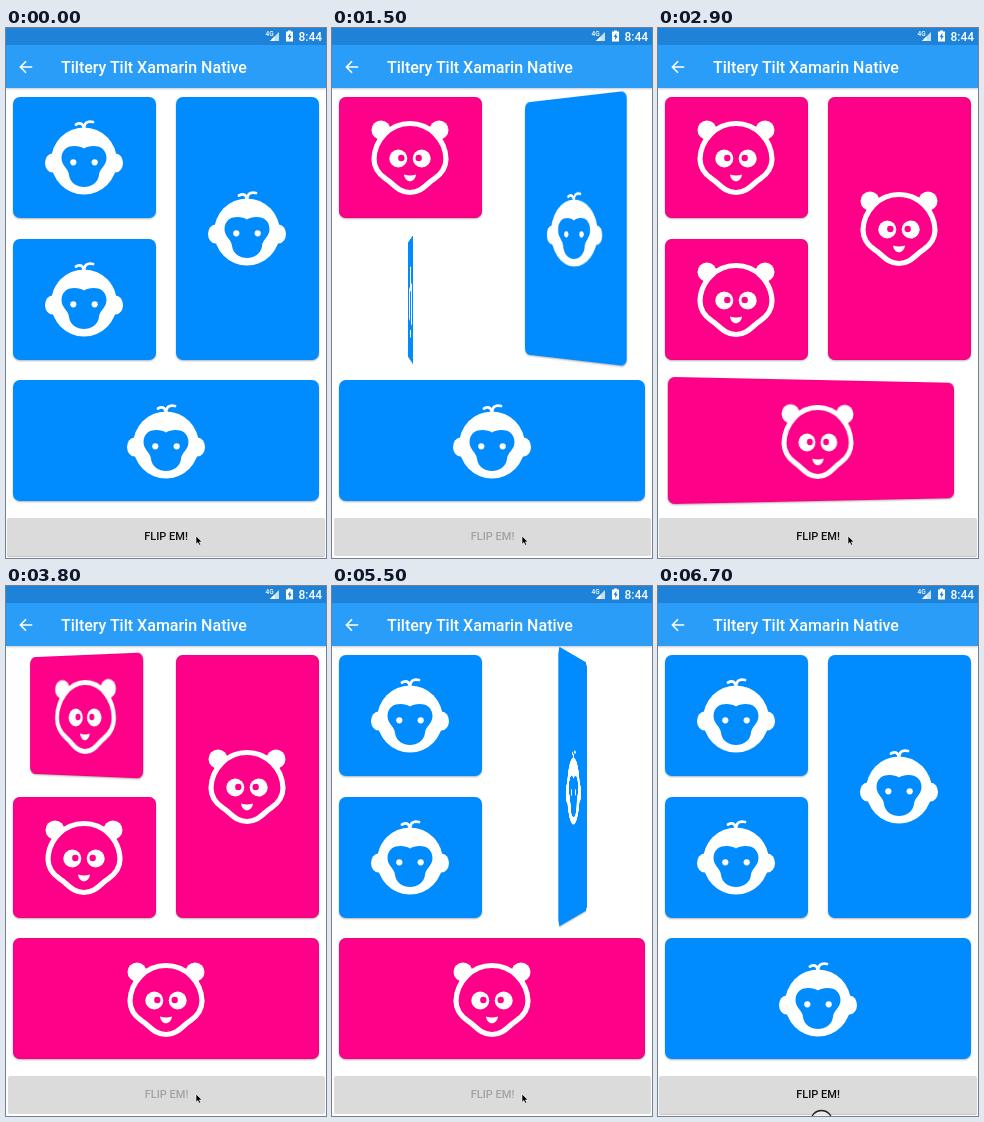
An HTML page for the animation above (6800 ms loop, 320x530 px).

```html
<!DOCTYPE html>
<html lang="en">
<head>
<meta charset="utf-8">
<title>Card flip</title>
<style>
  html, body { margin: 0; width: 100%; height: 100%; overflow: hidden; background: #fff; }
  #stage { position: relative; width: 320px; height: 530px; overflow: hidden; font-family: Roboto, sans-serif; font-weight: 500; }
  #stage > * { position: absolute; }
  .bar { left: 0; top: 0; width: 320px; height: 60px; background: linear-gradient(#1e82d9 17px, #2a9df8 17px); box-shadow: 0 1px 2px rgba(0, 0, 0, .22); }
  .bar svg { display: block; }
  .card { border-radius: 7px; background: #008cff; color: #008cff; box-shadow: 0 1px 2px rgba(0, 0, 0, .3); }
  .card.back { background: #ff0088; color: #ff0088; box-shadow: 0 1px 2px rgba(0, 0, 0, .3), inset 0 0 1px rgba(70, 0, 40, .6); }
  .card svg { position: absolute; left: 50%; top: 50%; margin: -45px; }
  .card .panda, .card.back .monkey { display: none; }
  .card.back .panda { display: block; }
  #button { left: 1px; top: 490px; width: 318px; height: 38px; border-radius: 2px; background: #dbdbdb; box-shadow: 0 1px 1px rgba(0, 0, 0, .25); color: #111; font-size: 11px; line-height: 38px; text-align: center; }
  #button.off { left: 2px; width: 317px; box-shadow: none; color: #a3a3a3; }
  #pointer { left: 0; top: 0; }
</style>
</head>
<body>
<div id="stage">
  <div class="bar">
    <svg width="320" height="60" fill="#fff">
      <text x="259.5" y="8" font-size="6.5">4G</text>
      <path d="M273 4V13H264Z" opacity=".75"/>
      <path d="M268.5 8.5V13H264Z"/>
      <path d="M282 2.5h3v1h2v10h-7v-10h2z"/>
      <path d="M284.3 5l-2.6 4h1.5v3l2.5-4h-1.4z" fill="#1e82d9"/>
      <text x="292.5" y="12.6" font-size="12">8:44</text>
      <path d="M26.2 39H15M20 33.2L14.4 39L20 44.8" fill="none" stroke="#fff" stroke-width="1.6"/>
      <text x="55" y="45" font-size="16">Tiltery Tilt Xamarin Native</text>
    </svg>
  </div>
  <div id="button">FLIP EM!</div>
  <svg id="pointer" width="320" height="530">
    <path id="arrow" d="M0 0V8.2L1.9 6.5L3.2 9.3L4.7 8.6L3.4 5.9H6Z" stroke="#fff" stroke-width=".6"/>
    <circle id="ring" cx="163.5" cy="535" r="10.5" fill="#fff" fill-opacity=".5" stroke="#222" stroke-width="1.3"/>
  </svg>
</div>

<template id="faces">
  <svg class="monkey" width="90" height="90" viewBox="-45 -45 90 90" fill="#fff">
    <path d="M0-27C0-33-3-35-8-32.5M0-27C0-34 3-36.5 9-35" fill="none" stroke="#fff" stroke-width="2.8" stroke-linecap="round"/>
    <ellipse cx="-31.5" cy="6" rx="7.5" ry="9.5"/>
    <ellipse cx="31.5" cy="6" rx="7.5" ry="9.5"/>
    <ellipse cy="4" rx="33" ry="33.5"/>
    <path d="M0-8.5C5-12 22-14 22.5 1C22.5 9 15 12 15 18C14 26 7 30 0 30S-14 26-15 18C-15 12-22.5 9-22.5 1C-22-14-5-12 0-8.5Z" fill="currentColor"/>
    <circle cx="-10.7" cy="5.3" r="3.1"/>
    <circle cx="10.7" cy="5.3" r="3.1"/>
  </svg>
  <svg class="panda" width="90" height="90" viewBox="-45 -45 90 90" fill="#fff">
    <circle cx="-29" cy="-27" r="9.5"/>
    <circle cx="29" cy="-27" r="9.5"/>
    <path d="M0-33.5C20-33.5 35.5-17 36 2C36 12 30 18 24 22C17 26 12 35.5 0 35.5S-17 26-24 22C-30 18-36 12-36 2C-35.5-17-20-33.5 0-33.5Z" fill="currentColor" stroke="#fff" stroke-width="5.2"/>
    <circle cx="-11.7" cy="1.5" r="9"/>
    <circle cx="11.7" cy="1.5" r="9"/>
    <circle cx="-8.7" cy="1" r="3.2" fill="currentColor"/>
    <circle cx="8.7" cy="1" r="3.2" fill="currentColor"/>
    <path d="M-6 17.5Q0 19.5 6 17.5C5 26.5-5 26.5-6 17.5Z"/>
  </svg>
</template>

<script>
  const LOOP = 6800, TICK = 100, FLIP = 950;
  const $ = id => document.getElementById(id);
  const clamp = x => Math.min(1, Math.max(0, x));

  // box: left, top, width, height; starts: flip to the back, flip to the front
  const cards = [
    { box: [6.5, 68.5, 143, 121], starts: [500, 3600] },
    { box: [6.5, 210.5, 143, 121], starts: [1036, 4499] },
    { box: [169.5, 68.5, 143, 263], starts: [1264, 4965] },
    { box: [6.5, 352, 306, 121], starts: [2061, 5640] }
  ];
  const disabled = [[400, 2061], [3500, 5640]];

  for (const card of cards) {
    const el = card.el = document.createElement('div');
    el.className = 'card';
    ['left', 'top', 'width', 'height'].forEach((key, i) => el.style[key] = card.box[i] + 'px');
    el.append($('faces').content.cloneNode(true));
    $('stage').insertBefore(el, $('button'));
  }

  function drawCard({ el, starts }, t) {
    const turns = starts.reduce((sum, s) => sum + clamp((t - s) / FLIP), 0);
    const shown = Math.round(turns);
    const angle = (shown - turns) * 180;
    el.classList.toggle('back', shown === 1);
    el.style.transform = angle ? `perspective(1120px) rotateY(${angle}deg)` : 'none';
  }

  function draw(t) {
    cards.forEach(card => drawCard(card, t));
    $('button').classList.toggle('off', disabled.some(([from, to]) => t >= from && t < to));
    const leave = clamp((t - 6300) / 300);
    $('arrow').setAttribute('transform', `translate(${190 - 27 * leave} ${508 + 22 * leave})`);
    $('arrow').style.display = t < 6600 ? '' : 'none';
    $('ring').style.display = t < 6600 ? 'none' : '';
  }

  const begin = performance.now();
  function frame() {
    const t = (performance.now() - begin) % LOOP;
    draw(Math.floor(t / TICK) * TICK);
    requestAnimationFrame(frame);
  }
  frame();
</script>
</body>
</html>
```
